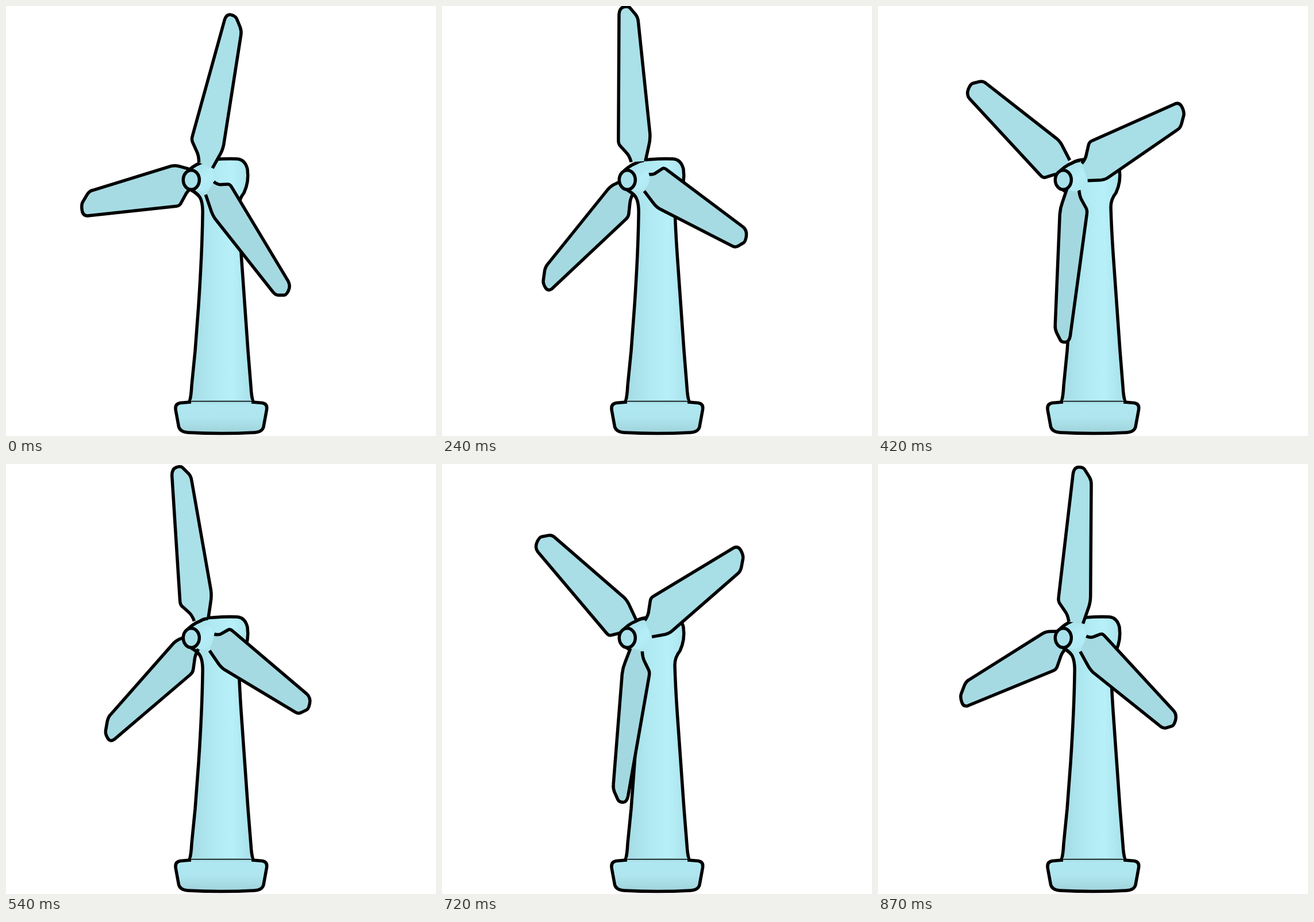
An HTML page with a canvas that plays this animation: 748x748 px, repeating every 900 ms.

```html
<!DOCTYPE html>
<html>
<head>
<meta charset="utf-8">
<title>Wind turbine</title>
<style>
  html, body { margin: 0; height: 100%; overflow: hidden; background: #fff; }
  canvas { display: block; }
</style>
</head>
<body>
<canvas id="stage" width="748" height="748"></canvas>
<script>
const ctx = document.getElementById('stage').getContext('2d');
const LOOP = 900, STEP = 30;
const HUB = { x: 342, y: 297.5 };
const SQUASH = .71;                    // the rotor is seen at an angle
const CONE = { x: .015, y: .008 };     // the blades lean slightly towards the nose
const PITCH = .06;

// Starting angle in degrees and extra distance from the hub.
const BLADES = [
  { start: 133.4, reach: 5 },
  { start: 259, reach: 5 },
  { start: 376, reach: 0 }
];

// One blade pointing up, with the hub at 0,0.
const blade = new Path2D(`M-14-22 Q-17-34-24-40 L-36-52 Q-40-56-39-63
  L-16-278 Q-14-289-4-290 Q6-291 10-287 L21-275 Q26-269 26-262
  L33-68 Q33-57 28-46 L18-21`);
const body = new Path2D(`M313 291 Q323 279 338 273 Q348 267 360 267 Q385 265 402 266
  Q416 267 420 284 Q423 306 414 325 Q405 336 405 350 Q406 385 409 430
  L421 600 L426 662 Q427 680 430 689 H319 Q322 680 323 660
  L329 600 L335 520 Q341 430 342 365 Q343 340 336 331 Q331 325 322 320 Z`);
const hubEdge = new Path2D('M313 291 Q323 279 338 273 Q344 269 351 269 M322 320 Q331 325 336 331');
const base = new Path2D(`M320 689 L303 690.5 Q294 692 295 702 L300.5 732 Q303 741 317 742
  Q374 745 432 742 Q446 741 448 732 L453.5 702 Q455 692 446 690.5 L429 689`);
const hub = new Path2D(), nose = new Path2D();
hub.ellipse(342, 299.5, 19, 23, 0, 0, 7);
nose.ellipse(322.3, 302.5, 14, 16.8, 0, 0, 7);

function gradient(x0, y0, x1, y1, ...colors) {
  const g = ctx.createLinearGradient(x0, y0, x1, y1);
  colors.forEach((color, i) => g.addColorStop(i / (colors.length - 1), color));
  return g;
}
const towerFill = gradient(325, 0, 428, 0, '#a6dce4', '#b0e9f2', '#b8f0fa', '#a8e0e9');
const baseFill = gradient(0, 689, 0, 744, '#b0e8f1', '#aee5ee', '#9fd2da');
const hubFill = gradient(330, 280, 358, 322, '#abe3ec', '#b5eef8', '#b0e8f2');

function paint(path, fill) {
  ctx.fillStyle = fill;
  ctx.fill(path);
  ctx.stroke(path);
}

function fill(path, color) {
  ctx.fillStyle = color;
  ctx.fill(path);
}

function drawBlade({ angle, reach }) {
  const s = Math.sin(angle), c = Math.cos(angle);
  const view = new DOMMatrix([
    SQUASH * c + PITCH, s, CONE.x - SQUASH * s, c + CONE.y, HUB.x, HUB.y
  ]).translate(0, -reach);
  const path = new Path2D();
  path.addPath(blade, view);
  paint(path, `rgb(${167 + 3 * c}, ${220 + 4 * c}, ${228 + 4 * c})`);
}

function draw(time) {
  const turn = time / LOOP * 360;
  const blades = BLADES.map(({ start, reach }) =>
    ({ angle: (start + turn) * Math.PI / 180, reach }));
  const isFar = b => Math.sin(b.angle) < -.14;

  ctx.clearRect(0, 0, 748, 748);
  ctx.strokeStyle = '#000';
  ctx.lineWidth = 5.5;
  ctx.lineJoin = 'round';

  fill(base, baseFill);
  paint(body, towerFill);
  // Only a hairline separates the tower from its base.
  ctx.fillStyle = '#abe2eb';
  ctx.fillRect(322, 685, 105, 8);
  ctx.fillStyle = '#000';
  ctx.fillRect(320, 686.8, 109, 1.6);
  ctx.stroke(base);

  blades.filter(isFar).forEach(drawBlade);
  fill(hub, hubFill);
  ctx.stroke(hubEdge);
  blades.filter(b => !isFar(b)).forEach(drawBlade);
  fill(hub, hubFill);
  paint(nose, '#a9e1ea');
}

function frame() {
  draw(Math.floor(performance.now() % LOOP / STEP) * STEP);
  requestAnimationFrame(frame);
}
frame();
</script>
</body>
</html>
```
